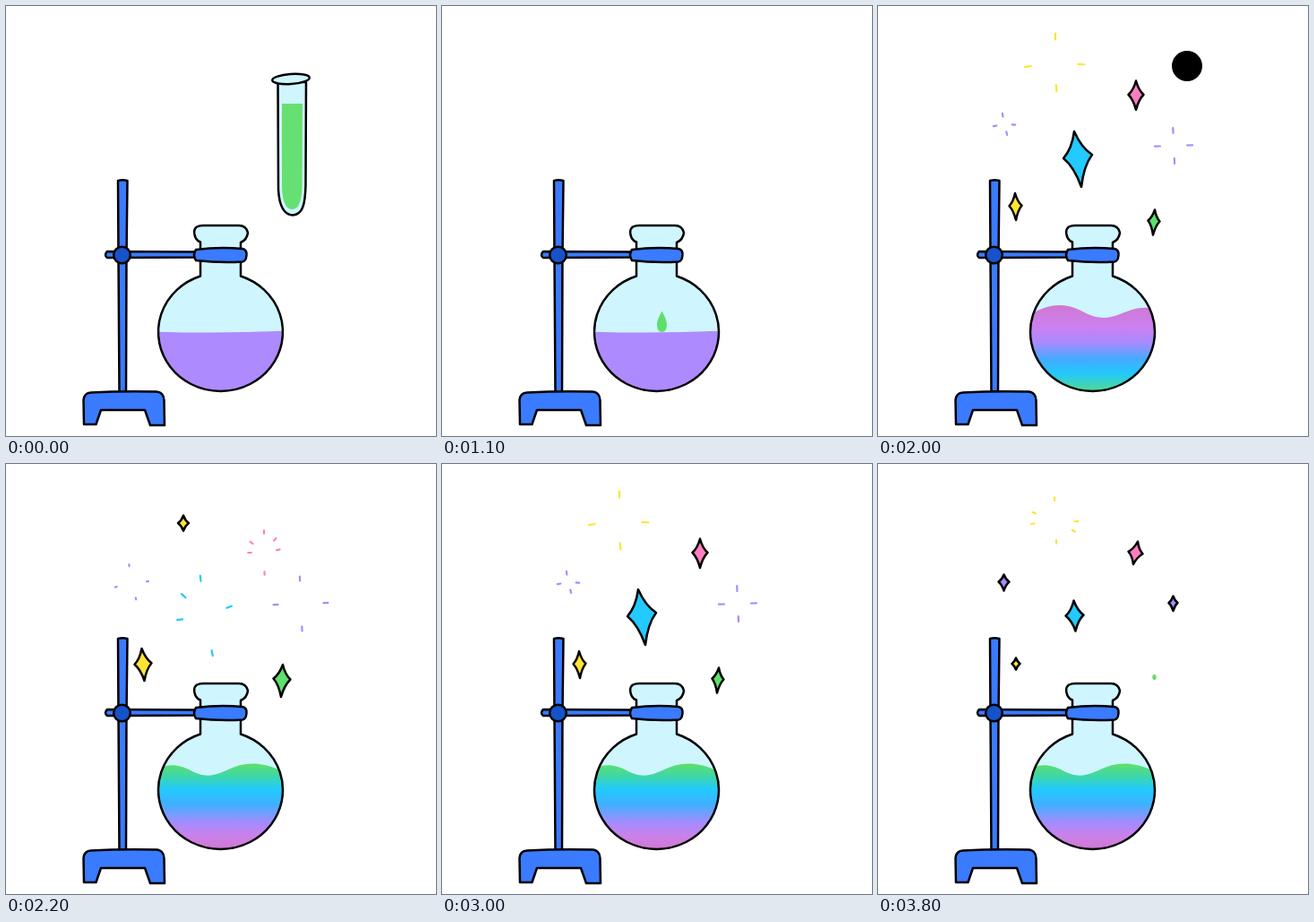
Recreate the animation shown at these times as an HTML page. Size 480 by 480 pixels, loop 4000 ms.

```html
<!DOCTYPE html>
<html lang="en">
<head>
<meta charset="utf-8">
<title>Flask experiment</title>
<style>
  html, body { margin: 0; width: 100%; height: 100%; overflow: hidden; background: #fff; }
  svg { display: block; width: 100%; height: 100%; }
  .ink { stroke: #000; stroke-width: 2.5; stroke-linejoin: round; stroke-linecap: round; }
  .glass { fill: #cff5ff; }
  .blue { fill: #3a7bff; }
  .dash { stroke-width: 2.2; stroke-linecap: round; }
</style>
</head>
<body>
<svg viewBox="0 0 480 480">
  <defs>
    <linearGradient id="pinkTop" gradientUnits="userSpaceOnUse" x1="0" y1="335" x2="0" y2="430">
      <stop offset="0" stop-color="#cf78d2"/>
      <stop offset=".24" stop-color="#cc80f0"/>
      <stop offset=".43" stop-color="#a98aff"/>
      <stop offset=".62" stop-color="#45aaff"/>
      <stop offset=".79" stop-color="#22c8fb"/>
      <stop offset="1" stop-color="#50da92"/>
    </linearGradient>
    <linearGradient id="greenTop" gradientUnits="userSpaceOnUse" x1="0" y1="335" x2="0" y2="430">
      <stop offset="0" stop-color="#5fdf6c"/>
      <stop offset=".15" stop-color="#3cd6ac"/>
      <stop offset=".3" stop-color="#22caff"/>
      <stop offset=".47" stop-color="#3fb0ff"/>
      <stop offset=".69" stop-color="#a58cff"/>
      <stop offset=".85" stop-color="#cc80e8"/>
      <stop offset="1" stop-color="#cf78d2"/>
    </linearGradient>
    <linearGradient id="streak" gradientUnits="userSpaceOnUse" x1="0" y1="65" x2="0" y2="152">
      <stop offset="0" stop-color="#22cfff"/>
      <stop offset=".23" stop-color="#5db4ff"/>
      <stop offset=".43" stop-color="#a98aff"/>
      <stop offset=".7" stop-color="#d880f0"/>
      <stop offset=".92" stop-color="#ff7fc0"/>
    </linearGradient>
    <path id="body" d="M217 263.500C210 261 208 250 213 246.500Q216 245 220 245H260Q268 245 270 253Q269 261 262 264V301.500A69.500 66 0 1 1 217 301.500Z"/>
    <clipPath id="inFlask"><use href="#body"/></clipPath>
    <clipPath id="inTube"><path d="M308 88V204C309 218 312 227 319.500 227C327 227 330 218 330.500 200L331 88Z"/></clipPath>
  </defs>

  <use href="#body" class="glass"/>
  <g clip-path="url(#inFlask)"><path id="liquid"/></g>
  <g id="drop"></g>
  <use href="#body" class="ink" fill="none"/>

  <g class="ink blue">
    <path d="M125 195Q130 193.500 135.500 195L134.500 280L134 432H126.500L125.500 280Z"/>
    <path d="M87 467L86.500 440Q87 432 95 431.500Q130 429.500 168 430.500Q176 431 176.500 440L177 468H161L155 451H106L100.500 467Z"/>
    <path d="M113 274Q109 278 113 281L214 280.500V274.500Z"/>
    <path d="M212 272Q238 268.500 264 271Q269 272 268.500 278Q268 285 264 285.500Q238 287 212 284Q208 278 212 272Z"/>
    <circle cx="129.500" cy="278" r="9.300" fill="#1653c9"/>
  </g>
  <g id="tube"></g>
  <g id="sky"></g>
</svg>
<script>
const $ = id => document.getElementById(id);
const YELLOW = '#ffe436', PINK = '#ff7ec0', PURPLE = '#a98aff', BLUE = '#22caff', GREEN = '#5fdf6c';
const LOOP = 4000, POP = 2000, BEAT = 200;
const TICKS = [0, 500, 700, 900, 1000, 1100];
for (let t = 1200; t < LOOP; t += BEAT) TICKS.push(t);

// Four-pointed star: half width, height up, height down, lean
const star = (x, y, w, up, down = up, lean = 0) => color => {
  const p = [[-lean, -up], [w, -lean / 2], [lean, down], [-w, lean / 2]];
  let d = `M${p[0]}`;
  p.forEach((a, i) => {
    const b = p[(i + 1) % 4];
    d += `Q${[(a[0] + b[0]) * .33, (a[1] + b[1]) * .33]} ${b}`;
  });
  return `<path class="ink" d="${d}Z" fill="${color}" transform="translate(${x} ${y})"/>`;
};

// Short strokes flying outward on an ellipse
const burst = (x, y, rx, ry, len, angles) => color => angles.map(deg => {
  const a = deg * Math.PI / 180, dx = rx * Math.cos(a), dy = ry * Math.sin(a);
  const k = (len - 2) / 2 / Math.hypot(dx, dy);
  return `<line class="dash" stroke="${color}" x1="${x + dx * (1 - k)}" y1="${y + dy * (1 - k)}" x2="${x + dx * (1 + k)}" y2="${y + dy * (1 + k)}"/>`;
}).join('');

const dot = (x, y) => color => `<ellipse cx="${x}" cy="${y}" rx="2.200" ry="2.900" fill="${color}"/>`;

const cross = [-92, -2, 87, 178];
const pinkRays = [-90, -40, -151, 180, -8, 88];
const blueRays = [-100, -148, -14, 175, 73];
const goldRays = [-114, -73, -172, -8, 125, 90];
const greenRays = [-120, -38, 15, 160, 127, 58];

// Each spark repeats five looks
const sparks = [
  [YELLOW, burst(197, 63, 30, 29, 9, [-88, 171, 4, 86]), star(198, 66, 6, 8.5), star(199, 66, 10, 13, 14, 2),
    star(200, 66, 14, 17.5, 18.5, 4), burst(197, 63, 24.5, 24, 5.5, [-90, -159, 171, 2, 29, 85])],
  [PINK, star(288, 99, 8.5, 15.5, 17), burst(288, 99, 16, 23, 5.5, pinkRays), burst(288, 99, 21, 29, 4, pinkRays),
    star(290.5, 99, 5, 7.5, 9), star(287.5, 99, 8, 12.5, 13, -2.5)],
  [PURPLE, burst(141, 132, 10.5, 10.5, 5.5, [-100, 3, 75, 170]), burst(140, 132, 18, 19, 4, [-98, -3, 74, 164]),
    burst(140, 132, 23, 24, 3, [-98, -3, 74, 164]), dot(141, 132.5), star(140.5, 131.5, 6, 8, 10)],
  [PURPLE, burst(330, 156, 18, 17, 8, cross), burst(329, 156, 28, 28, 7, cross), burst(330, 156, 34, 34, 4, cross),
    dot(332, 156.5), star(329.5, 155, 5, 7.5, 9)],
  [BLUE, star(223, 168, 16, 28, 34, 4), burst(222, 170, 28, 43, 8, blueRays), burst(222, 170, 34, 51, 5, blueRays),
    star(224, 168, 5.5, 8.5, 10, 1), star(219.5, 169, 10, 16.5, 17.5, 1)],
  [YELLOW, star(153.5, 223, 7, 14, 16, .5), star(153, 223, 9.5, 17, 19, 1.5), burst(154, 221, 11, 16, 7, goldRays),
    burst(154, 221, 14.5, 21, 7, goldRays), star(154, 223, 4.5, 6.5)],
  [GREEN, star(308, 240, 6.5, 12.5, 15.5, -1), star(308, 240, 9.5, 16, 20, -1), burst(311, 240, 14, 17, 6, greenRays),
    burst(311, 240, 18.5, 22, 5.5, greenRays), dot(308.5, 238)]
];

const badges = { 2000: [345, 67], 3200: [279, 200], 3600: [345, 67] };

// tilt, lift, point where the liquid surface crosses the tube axis
const pours = { 0: [0, 0, 109], 500: [35, 0, 109], 700: [70, 0, 116], 900: [100, 0, 150], 1000: [125, -28, 98] };
const drops = { 900: [243, 190], 1000: [244, 248], 1100: [245.5, 352] };
// centre and turn
const streaks = { 1200: [308, 195, 75], 1400: [272, 161, 15], 1600: [228, 105, 0], 1800: [206, 54, 12] };

function drawTube(pose) {
  if (!pose) return '';
  const [tilt, lift, level] = pose;
  return `<g transform="translate(0 ${lift}) rotate(${-tilt} 320 155)">
    <path class="ink glass" d="M303.500 85L304 205C305 222 309 233 320 233.500C331 233 334 222 334.500 200L335 85Z"/>
    <g clip-path="url(#inTube)"><rect x="119" y="${level}" width="400" height="300" fill="#66e073" transform="rotate(${tilt} 319 ${level})"/></g>
    <ellipse class="ink glass" cx="318" cy="81.500" rx="20.800" ry="5.500" transform="rotate(-4 318 81.500)"/></g>`;
}

const drawDrop = p => p
  ? `<path transform="translate(${p})" fill="#5fdf6c" d="M0-11.500C2-7 5.500-2 5.500 4C5.500 9 3 12 0 12C-3 12-5.500 9-5.500 4C-5.500-2-2-7 0-11.500Z"/>` : '';

const drawStreak = p => p
  ? `<path transform="translate(${p[0]} ${p[1]}) rotate(${p[2]}) translate(-228 -105)" fill="url(#streak)" d="M204 85C204 72 211 65 218 65C226 66 228 73 228 85C226 104 234 117 250 130C258 137 263 143 265.500 149Q265 153 261 152.500C258 145 252 141 243 138C222 130 204 110 204 85Z"/>` : '';

function setLiquid(t) {
  const flip = (t / BEAT) % 2;
  let fill = '#ae8aff', d = 'M165 363.500Q240 366 315 362.500V435H165Z';
  if (t >= 1200) {
    fill = flip ? 'url(#greenTop)' : 'url(#pinkTop)';
    d = flip
      ? 'M165 341C183 333 195 336 206 342C222 351 233 348 246 342C264 333 284 330 312 345V435H165Z'
      : 'M165 349C185 332 205 331 222 338C240 347 250 352 270 344C285 338 295 334 315 339V435H165Z';
  }
  $('liquid').setAttribute('fill', fill);
  $('liquid').setAttribute('d', d);
}

function drawSky(t) {
  let out = drawStreak(streaks[t]);
  if (t >= POP) {
    const look = 1 + (t - POP) / BEAT % 5;
    out += sparks.map(s => s[look](s[0])).join('');
  }
  const b = badges[t];
  if (b) out += `<circle cx="${b[0]}" cy="${b[1]}" r="17"/>`;
  return out;
}

let shown = -1;
function frame() {
  const now = performance.now() % LOOP;
  const t = TICKS.filter(k => k <= now).pop();
  if (t !== shown) {
    shown = t;
    setLiquid(t);
    $('tube').innerHTML = drawTube(pours[t]);
    $('drop').innerHTML = drawDrop(drops[t]);
    $('sky').innerHTML = drawSky(t);
  }
  requestAnimationFrame(frame);
}
frame();
</script>
</body>
</html>
```
